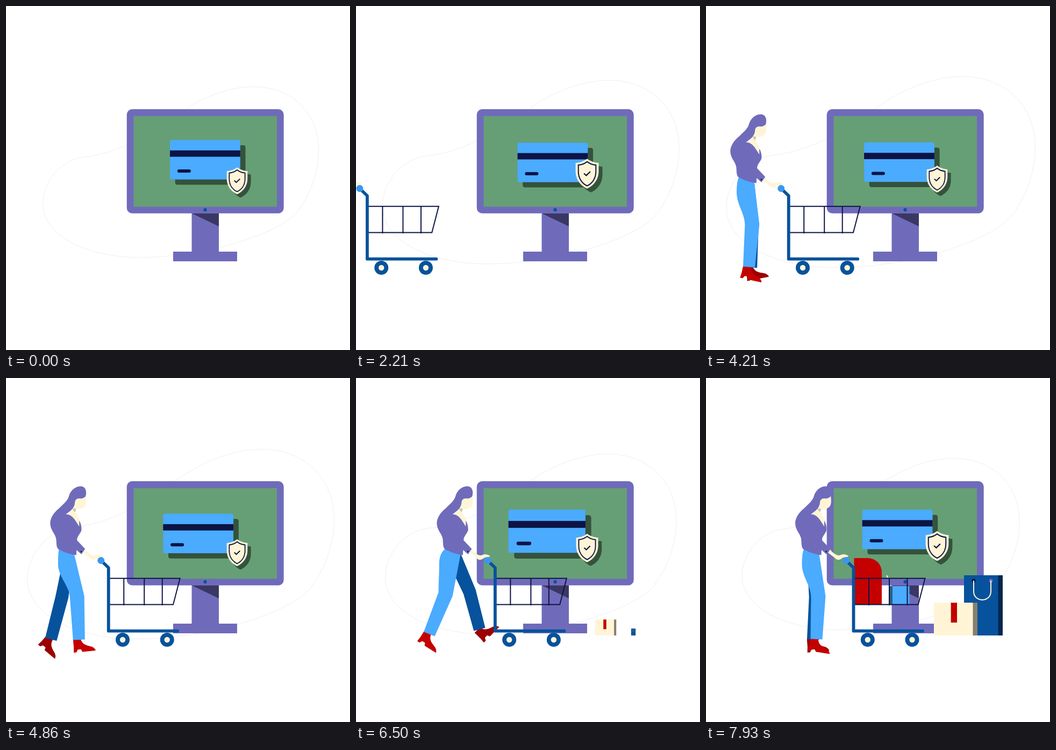
Recreate the animation shown at these times as an HTML page. Size 640 by 640 pixels, loop 8000 ms.

```html
<!DOCTYPE html>
<html lang="en">
<head>
<meta charset="utf-8">
<title>Checkout</title>
<style>
  html, body { margin: 0; width: 100%; height: 100%; overflow: hidden; background: #fff; }
  svg { display: block; width: 100vw; height: 100vh; }
  .violet { fill: #6f6bba; }
  .blue { fill: #07529c; }
  .sky { fill: #4aabff; }
  .navy { fill: #0c1445; }
  .cream { fill: #fff5d6; }
  .red { fill: #c40000; }
  .maroon { fill: #9c0000; }
  .shade { fill: #34523c; }
  .line { fill: none; stroke: #0c1445; stroke-width: 2; }
</style>
</head>
<body>
<svg viewBox="0 0 640 640">
  <defs>
    <path id="shieldShape" d="M0-25Q8-19 19.3-18V-4C19 12 9 21 0 25C-9 21-19 12-19.3-4V-18Q-8-19 0-25Z"/>
    <path id="shoe" d="M-11-2H3C5 9 11 11 22 15Q28 18 29 23H4L2 18H-4L-7 23H-12L-11 13Z"/>
    <g id="wheel"><circle class="blue" r="13"/><circle class="cream" r="5.2"/></g>
  </defs>

  <path id="blob" fill="none" stroke="#efefef" vector-effect="non-scaling-stroke"
    d="M461 150C532 150 582 199 582 268C582 310 565 355 540 385C516 412 455 435 396 450C350 461 300 468 250 468C150 468 68 428 68 368C68 328 100 286 145 281C224 272 275 229 334 191C372 167 417 150 461 150Z"/>

  <g class="violet">
    <path d="M345.5 380H396V457H430V475H311V457H345.5Z"/>
    <path d="M346 386H396V410Z" fill="#3a3764"/>
    <rect x="224.7" y="192" width="292" height="193.7" rx="10"/>
    <rect x="237.5" y="204.8" width="266.5" height="168.7" fill="#669f76"/>
    <circle class="blue" cx="370.5" cy="379.2" r="3.1"/>
  </g>

  <g id="card">
    <rect class="shade" x="-55.7" y="-27.1" width="130.8" height="73.5" rx="4"/>
    <rect class="sky" x="-65.4" y="-36.8" width="130.8" height="73.5" rx="3.5"/>
    <rect class="navy" x="-65.4" y="-17.5" width="130.8" height="11.8"/>
    <rect class="navy" x="-51.6" y="17.8" width="25" height="6" rx="3"/>
  </g>
  <g id="shield">
    <use href="#shieldShape" x="6.3" y="6.3" class="shade"/>
    <use href="#shieldShape" class="cream"/>
    <use href="#shieldShape" transform="scale(.76 .81)" class="line" style="stroke-width:2.4"/>
    <path class="line" d="M-5.3-.5L-1.5 3L5.3-3.6"/>
  </g>

  <g id="bag">
    <path class="blue" d="M480 367H544V479H480Z"/>
    <path d="M543.5 367H552V479H543.5Z" fill="#04264f"/>
    <circle class="navy" cx="498" cy="377" r="3.5"/>
    <circle class="violet" cx="530" cy="377" r="3.5"/>
    <path d="M498 377V397C498 418 530 418 530 397V377" fill="none" stroke="#fff5d6" stroke-width="2"/>
  </g>
  <g id="parcel">
    <path class="cream" d="M424 418H497V479H424Z"/>
    <path d="M496.5 418H505V479H496.5Z" fill="#85806f"/>
    <path class="red" d="M455.7 418H467V455H455.7Z"/>
  </g>

  <g id="walker">
    <use id="farShoe" href="#shoe" class="maroon"/>
    <path id="farLeg" class="blue"/>
    <use id="nearShoe" href="#shoe" class="red"/>
    <path id="nearLeg" class="sky"/>
    <g transform="translate(-259.5)">
      <path class="cream" d="M197 224L217 219C219 232 218 241 208 243Q203 245 199 243L198 250L205 262V276L194 266L178 255Q190 250 196 240Z"/>
      <path d="M192 243L199.5 243L197 250Z" fill="#cbc4ad"/>
      <path class="violet" d="M180 253.500C188 248 196 243 197 232C197 227 200 224 205 224Q213 225 217 220C219 212 218 203 209 201.500C198 201 189 209 186 219C184 228 176 234 168 242C158 250 151 260 151 270C151 283 160 289 162 299C163 309 162 316 167 319C175 323 186 328 199.500 329.500L200 320L209 328L216 318L201 302C200 296 208 288 209 284C210 278 208 270 205 265V276C199 268 193 253 180 253.500Z"/>
      <circle class="navy" cx="208.7" cy="323" r="1.4"/>
      <path class="cream" d="M216 319C222 327 230 332 236 329Q243 326 250 331Q249 334 240 334C234 339 229 340 225 335L212 325Z"/>
    </g>
  </g>

  <g id="cart">
    <path id="tall" class="red" d="M1 335H26.500A26 26 0 0 1 52.500 361V421.500H1Z"/>
    <g id="small">
      <path class="sky" d="M66.500 387H104V421.500H66.500Z"/>
      <path d="M66.500 387H72.500V421.500H66.500Z" fill="#2c5f86"/>
      <path class="cream" d="M61 367Q65 367 64 372L62 371Z"/>
    </g>
    <path class="line" d="M0 372.800H133L120.300 421.500H0M28.500 372.800V423M66.500 372.800V423M100 372.800V423"/>
    <path d="M-13 340.500L0 353V470.700H128.500" fill="none" stroke="#07529c" stroke-width="5.8" stroke-linecap="round" stroke-linejoin="round"/>
    <circle cx="-14" cy="339.5" r="6.5" fill="#3b97ee"/>
    <use href="#wheel" x="26.3" y="487"/>
    <use href="#wheel" x="109" y="487"/>
  </g>
</svg>
<script>
const LOOP = 8000;
const part = id => document.getElementById(id);
const place = (id, value) => part(id).setAttribute('transform', value);
const cycle = turns => Math.cos(2 * Math.PI * turns);

const ease = (t, start, length) => {
  const u = Math.min(1, Math.max(0, (t - start) / length));
  return u * u * (3 - 2 * u);
};
const pulse = (t, rise, riseLength, fall, fallLength) =>
  ease(t, rise, riseLength) * (1 - ease(t, fall, fallLength));

// Rolls in at a steady speed that fades to a stop.
function cartX(t) {
  const u = Math.min(1, t / 7600);
  return -138.2 + 412.7 * (4 * u - u ** 4) / 3;
}

// Steps walked; they slow down as the cart comes to rest.
function steps(t) {
  const late = Math.max(0, t - 6500);
  return (t - late * late / 3560 - 3430) / 3070;
}

// Each "At" is the point of the step where that motion peaks; x is measured from the cart post.
const near = {
  centre: -90, stride: 36, strideAt: .43, lift: 11, liftAt: -.04,
  tilt: 13, swing: 19, swingAt: 0, bend: 9, kick: 0, half: 13.5, seat: true
};
const far = {
  centre: -68.5, stride: 39.5, strideAt: 0, lift: 33, liftAt: .84,
  tilt: -1, swing: 46, swingAt: .54, bend: 7, kick: 16, half: 12, seat: false
};

// The two trouser edges at a joint, square to the direction from a to b.
function edges([x, y], a, b, half) {
  const dx = b[0] - a[0], dy = b[1] - a[1], k = half / Math.hypot(dx, dy);
  return [[x - dy * k, y + dx * k], [x + dy * k, y - dx * k]];
}

function drawLeg(name, leg, phase) {
  const hip = [-80, 328];
  const raised = ((1 + cycle(phase - leg.liftAt)) / 2) ** 2;
  const ankle = [leg.centre + leg.stride * cycle(phase - leg.strideAt), 487 - leg.lift * raised];
  const kick = leg.kick * Math.max(0, cycle(phase - .75));
  const knee = [(hip[0] + ankle[0]) / 2 + leg.bend + kick, (hip[1] + ankle[1]) / 2 + kick];

  const [kneeBack, kneeFront] = edges(knee, hip, ankle, leg.half);
  const [cuffBack, cuffFront] = edges(ankle, knee, ankle, 11);
  const seat = -96.5 + .3 * (knee[0] + 67);
  const back = leg.seat
    ? `M-92 317Q${seat} 326 ${seat} 346C${seat} 370 ${kneeBack[0]} ${kneeBack[1] - 22} ${kneeBack}`
    : `M-80 325L-86 345L${kneeBack}`;
  part(name + 'Leg').setAttribute('d', `${back}L${cuffBack}L${cuffFront}L${kneeFront}L-64 327Z`);

  const angle = leg.tilt + leg.swing * cycle(phase - leg.swingAt);
  place(name + 'Shoe', `translate(${ankle}) rotate(${angle})`);
}

const grow = (id, x, y, s) => place(id, `translate(${x} ${y}) scale(${s}) translate(${-x} ${-y})`);

function render(t) {
  const swell = (271.3 + 16 * cycle((t - 4110) / 9400)) / 257;
  place('blob', `translate(325.2 309) scale(${swell}) translate(-325 -309)`);

  const cardX = 362.9 + 7.7 * cycle((t + 500) / 14600);
  const cardY = 286.3 + 5.3 * cycle((t - 3050) / 12000);
  place('card', `translate(${cardX} ${cardY}) scale(${1 + .096 * pulse(t, 6000, 500, 6500, 500)})`);

  const shieldY = 318.4 + 6.8 * cycle(t / 5000);
  place('shield', `translate(430 ${shieldY}) scale(${1 + .115 * pulse(t % 5000, 500, 1900, 2850, 550)})`);

  const x = cartX(t);
  place('cart', `translate(${x})`);
  place('walker', `translate(${x})`);
  drawLeg('near', near, steps(t));
  drawLeg('far', far, steps(t));

  grow('parcel', 464.5, 479, ease(t, 6010, 1000));
  grow('bag', 516, 479, ease(t, 6290, 1000));
  grow('tall', 26.5, 421.5, ease(t, 6700, 1000));
  grow('small', 85, 421.5, ease(t, 6930, 1000));
}

function frame() {
  render(performance.now() % LOOP);
  requestAnimationFrame(frame);
}
frame();
</script>
</body>
</html>
```
